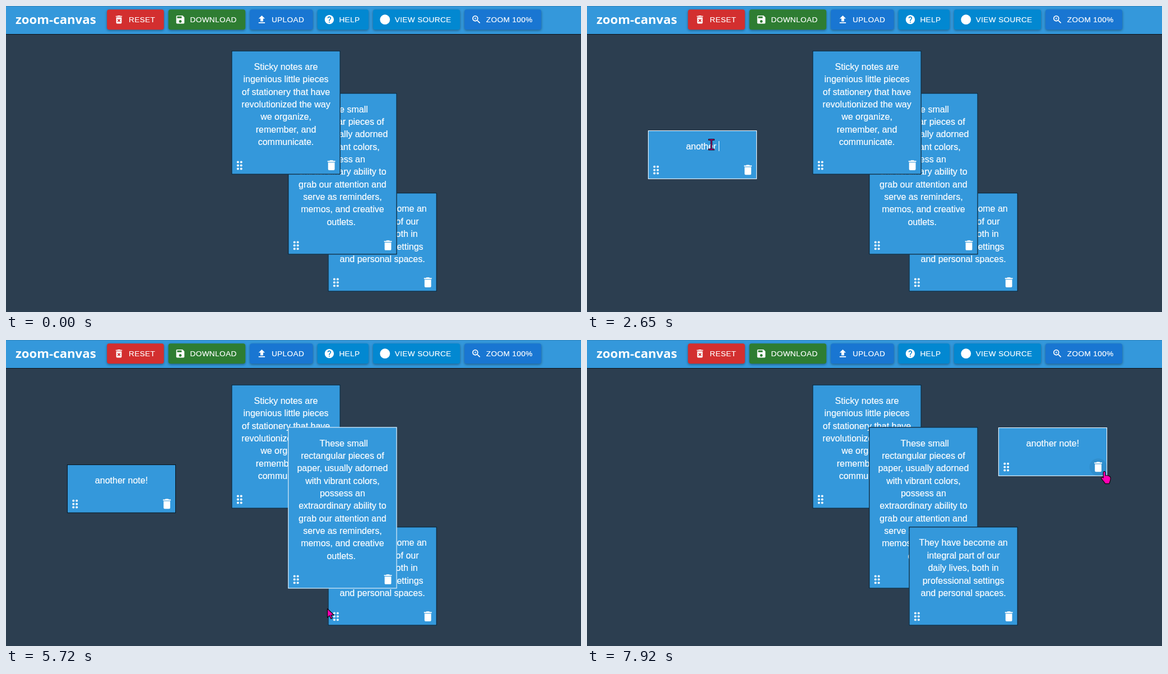
These frames come from a looping animation (1026x546 px, 7990 ms). An HTML page with a canvas:

```html
<!DOCTYPE html>
<html lang="en">
<head>
<meta charset="utf-8">
<title>zoom-canvas</title>
<style>
html, body { margin: 0; width: 100%; height: 100%; overflow: hidden; background: #2c3e50; }
canvas { display: block; }
</style>
</head>
<body>
<canvas id="stage" width="1026" height="546"></canvas>
<script>
const ctx = document.getElementById('stage').getContext('2d');
const LOOP = 7990;
const SANS = '"Liberation Sans", Arial, sans-serif';
const BLUE = '#3498db', DARK = '#2c3e50', PINK = '#ff00b4';
const NOTE_W = 194.2, LINE = 22.37;

// 24-unit icons
const BIN = 'M6 19c0 1.1.9 2 2 2h8c1.1 0 2-.9 2-2V7H6v12z';
const ICONS = {
  trash: BIN + 'M19 4h-3.5l-1-1h-5l-1 1H5v2h14V4z',
  reset: BIN + 'm2.46-7.12l1.41-1.41L12 12.59l2.12-2.12 1.41 1.41L13.41 14l2.12 2.12-1.41 1.41L12 15.41l-2.12 2.12-1.41-1.41L10.59 14l-2.13-2.12zM15.5 4l-1-1h-5l-1 1H5v2h14V4z',
  save: 'M17 3H5c-1.11 0-2 .9-2 2v14c0 1.1.89 2 2 2h14c1.1 0 2-.9 2-2V7l-4-4zm-5 16c-1.66 0-3-1.34-3-3s1.34-3 3-3 3 1.34 3 3-1.34 3-3 3zm3-10H5V5h10v4z',
  upload: 'M5 20h14v-2H5v2zM5 10h4v6h6v-6h4l-7-7-7 7z',
  help: 'M12 2C6.48 2 2 6.48 2 12s4.48 10 10 10 10-4.48 10-10S17.52 2 12 2zm1 17h-2v-2h2v2zm2.07-7.75l-.9.92C13.45 12.9 13 13.5 13 15h-2v-.5c0-1.1.45-2.1 1.17-2.83l1.24-1.26c.37-.36.59-.86.59-1.41 0-1.1-.9-2-2-2s-2 .9-2 2H8c0-2.21 1.79-4 4-4s4 1.79 4 4c0 .88-.36 1.68-.93 2.25z',
  disc: 'M12 1a11 11 0 1 0 0 22a11 11 0 1 0 0-22z',
  zoom: 'M15.5 14h-.79l-.28-.27C15.41 12.59 16 11.11 16 9.5 16 5.91 13.09 3 9.5 3S3 5.91 3 9.5 5.91 16 9.5 16c1.61 0 3.09-.59 4.23-1.57l.27.28v.79l5 4.99L20.49 19l-4.99-5zm-6 0C7.01 14 5 11.99 5 9.5S7.01 5 9.5 5 14 7.01 14 9.5 11.99 14 9.5 14zM12 10h-2v2H9v-2H7V9h2V7h1v2h2v1z'
};
for (const k in ICONS) ICONS[k] = new Path2D(ICONS[k]);

const CURSORS = {
  arrow: new Path2D('M.5 .5V16.3L4.2 12.8 6.9 18.4 9.3 17.3 6.7 11.8H12Z'),
  hand: new Path2D('M-1.5 1.5C0 0 2 .5 2 2.5V8C6 7.2 11.3 8.6 11.3 12.5 11.3 17 10 19 8.8 22.3H1.5C0 18.5-4 16-5.5 12.6-5.5 10.5-3 10.2-1.8 12V2Z'),
  beam: new Path2D('M-4-8.5H4M-4 9H4M0-8.5V9')
};

const BUTTONS = [
  ['#d32f2f', 'reset', 'RESET'],
  ['#2e7d32', 'save', 'DOWNLOAD'],
  ['#1976d2', 'upload', 'UPLOAD'],
  ['#0288d1', 'help', 'HELP'],
  ['#0288d1', 'disc', 'VIEW SOURCE'],
  ['#1976d2', 'zoom', 'ZOOM 100%']
];

const note = (x, y, text) => ({ x, y, lines: text.split('|') });
const first = note(402.4, 79.7, 'Sticky notes are|ingenious little pieces|of stationery that have|revolutionized the way|we organize,|remember, and|communicate.');
const second = note(503.3, 155.4, ' These small|rectangular pieces of|paper, usually adorned|with vibrant colors,|possess an|extraordinary ability to|grab our attention and|serve as reminders,|memos, and creative|outlets. ');
const third = note(574.5, 333.3, 'They have become an|integral part of our|daily lives, both in|professional settings|and personal spaces.');
const HOME = { x: 108.9, y: 222.1 };
const fresh = note(HOME.x, HOME.y, '');

// Pointer stops: arrival time, x, y, travel time
const STOPS = [
  [70, 351, 309, 0], [630, 201, 256, 400], [1300, 222, 247, 100], [3720, 230, 112, 0],
  [3970, 226, 38, 180], [4420, 280, 444, 400], [4870, 540, 401, 310], [5690, 573, 479, 310],
  [5830, 588, 492, 50], [6200, 96, 290, 300], [6400, 123, 293, 130], [6788, 701, 238, 148],
  [7060, 748, 227, 190], [7450, 994, 310, 240], [7700, 923, 234, 250]
];
const MADE = 950, BLUR = 4440, PICK_2 = 5030, PICK_3 = 5830, GRAB = 6470, DROP = 7130;
const CLICKS = [770, MADE, BLUR, PICK_2, PICK_3];
const BURSTS = [[1770, 'a'], [1990, 'noth'], [2450, 'er note'], [3120, '!']];
const KEY_MS = 68, DRAG_LAG = 141;

const within = (v, a, b) => v >= a && v < b;
const clamp = v => Math.min(1, Math.max(0, v));
const smooth = p => p * p * (3 - 2 * p);
// The screen was sampled in coarse ticks
const tick = t => 3720 + Math.floor((t - 3720) / 68.2) * 68.2;

function pointer(t) {
  let [, x, y] = STOPS[0];
  for (const [end, toX, toY, span] of STOPS) {
    if (t < end - span) break;
    const p = span ? smooth(clamp(1 - (end - t) / span)) : 1;
    x += (toX - x) * p;
    y += (toY - y) * p;
  }
  return { x, y };
}

const typed = t => BURSTS.map(([start, s]) =>
  s.slice(0, Math.max(0, Math.floor((t - start) / KEY_MS) + 1))).join('');

const noteH = n => 64.3 + LINE * n.lines.length;

function disc(x, y, r, fill) {
  ctx.fillStyle = fill;
  ctx.beginPath();
  ctx.arc(x, y, r, 0, Math.PI * 2);
  ctx.fill();
}

function icon(name, cx, cy, size) {
  ctx.save();
  ctx.translate(cx - size / 2, cy - size / 2);
  ctx.scale(size / 24, size / 24);
  ctx.fillStyle = '#fff';
  ctx.fill(ICONS[name]);
  ctx.restore();
}

function label(text, x, y, color = '#fff') {
  ctx.fillStyle = ctx.strokeStyle = color;
  ctx.lineWidth = .2;
  ctx.fillText(text, x, y);
  ctx.strokeText(text, x, y);
}

function button(x, w, [color, name, text], hover) {
  ctx.save();
  ctx.shadowColor = 'rgba(0,0,0,.38)';
  ctx.shadowBlur = 4;
  ctx.shadowOffsetY = 1.5;
  ctx.fillStyle = hover ? '#c62828' : color;
  ctx.beginPath();
  ctx.roundRect(x, 6.3, w, 36, 4);
  ctx.fill();
  ctx.restore();
  icon(name, x + 21.3, 24.2, 19.4);
  label(text, x + 38.8, 29);
}

function header(mouse) {
  ctx.fillStyle = BLUE;
  ctx.fillRect(0, 0, 1026, 50);
  ctx.fillStyle = '#2b83bd';
  ctx.fillRect(0, 0, 1026, 1);
  ctx.fillStyle = '#0c1116';
  ctx.fillRect(0, 50, 1026, 1);
  ctx.fillStyle = '#fff';
  ctx.font = '700 22.2px "Open Sans", "Noto Sans", sans-serif';
  ctx.fillText('zoom-canvas', 17, 32);
  ctx.font = '13.58px ' + SANS;
  ctx.letterSpacing = '0.39px';
  let x = 180.2;
  for (const b of BUTTONS) {
    const w = ctx.measureText(b[2]).width + 54.3;
    button(x, w, b, b[1] === 'reset' && overReset(mouse));
    x += w + 8;
  }
  ctx.letterSpacing = '0px';
}

function drawNote(n, focused, mouse) {
  const { x, y } = n, h = noteH(n);
  ctx.fillStyle = BLUE;
  ctx.fillRect(x, y, NOTE_W, h);
  ctx.strokeStyle = focused ? '#fff' : '#05080b';
  ctx.lineWidth = 1;
  ctx.strokeRect(x + .5, y + .5, NOTE_W - 1, h - 1);
  ctx.font = '16px ' + SANS;
  n.lines.forEach((line, i) => {
    const left = x + (NOTE_W - ctx.measureText(line).width) / 2;
    label(line, left, y + 34.1 + LINE * i, n.hint ? 'rgba(255,255,255,.45)' : '#fff');
  });
  for (let i = 0; i < 6; i++) disc(x + 11.4 + i % 2 * 5.9, y + h - 22 + (i >> 1) * 5.9, 2, '#fff');
  if (overTrash(n, mouse)) disc(x + 178.2, y + h - 16, 15.5, 'rgba(0,0,0,.06)');
  icon('trash', x + 178.2, y + h - 16.4, 23.6);
}

function updateFresh(t) {
  const text = typed(t);
  Object.assign(fresh, HOME, { hint: !text, lines: [text || 'Enter description'] });
  if (t < GRAB) return;
  const from = pointer(GRAB), to = pointer(Math.min(tick(t) - DRAG_LAG, DROP));
  fresh.x += to.x - from.x;
  fresh.y += to.y - from.y;
}

function drawCaret(t) {
  const on = within(t, MADE, 1570) || within(t, 1770, 4200);
  if (!on) return;
  const half = ctx.measureText(typed(t)).width / 2;
  ctx.fillStyle = '#fff';
  ctx.fillRect(Math.floor(fresh.x + NOTE_W / 2 + half), Math.round(fresh.y) + 19, 1, 18);
}

const overReset = m => within(m.x, 180, 282) && within(m.y, 6, 42);
const overNote = (n, m) => within(m.x, n.x, n.x + NOTE_W) && within(m.y, n.y, n.y + noteH(n));
const overTrash = (n, m) => Math.hypot(m.x - n.x - 178, m.y - n.y - noteH(n) + 16) < 16;
const overText = (n, m) => within(m.x, n.x + 16, n.x + NOTE_W - 16) &&
  within(m.y, n.y + 16, n.y + noteH(n) - 40);

function cursorKind(t, m, notes) {
  if (within(t, GRAB + 170, 7060)) return 'beam';
  const n = notes.filter(k => overNote(k, m)).pop();
  if (overReset(m) || n && overTrash(n, m)) return 'hand';
  return n && overText(n, m) ? 'beam' : 'arrow';
}

function drawPointer(t, { x, y }, kind) {
  x = Math.round(x);
  y = Math.round(y);
  const shape = CURSORS[kind];
  ctx.save();
  ctx.translate(x, y);
  ctx.lineJoin = 'round';
  ctx.strokeStyle = '#10060e';
  if (kind === 'beam') {
    ctx.lineCap = 'square';
    ctx.lineWidth = 3;
    ctx.stroke(shape);
    ctx.strokeStyle = '#d4009a';
    ctx.lineWidth = 1;
    ctx.stroke(shape);
  } else {
    ctx.fillStyle = PINK;
    ctx.fill(shape);
    ctx.lineWidth = 1.2;
    ctx.stroke(shape);
  }
  ctx.restore();
  const pressed = within(t, GRAB, DROP) || CLICKS.some(c => within(t, c, c + 85));
  if (pressed) disc(x + .5, y, 12, 'rgba(176,174,26,.8)');
}

function draw(t) {
  const mouse = pointer(tick(t));
  const notes = t < PICK_2 ? [third, second, first]
    : t < PICK_3 ? [third, first, second] : [first, second, third];
  if (t >= MADE) notes.push(fresh);
  const focus = t < BLUR || t >= GRAB ? fresh
    : t < PICK_2 ? null : t < PICK_3 ? second : third;
  updateFresh(t);
  ctx.fillStyle = DARK;
  ctx.fillRect(0, 0, 1026, 546);
  header(mouse);
  for (const n of notes) drawNote(n, n === focus, mouse);
  drawCaret(t);
  if (t >= 70) drawPointer(t, mouse, cursorKind(t, mouse, notes));
}

const begin = performance.now();
function loop() {
  draw((performance.now() - begin) % LOOP);
  requestAnimationFrame(loop);
}
loop();
</script>
</body>
</html>
```
